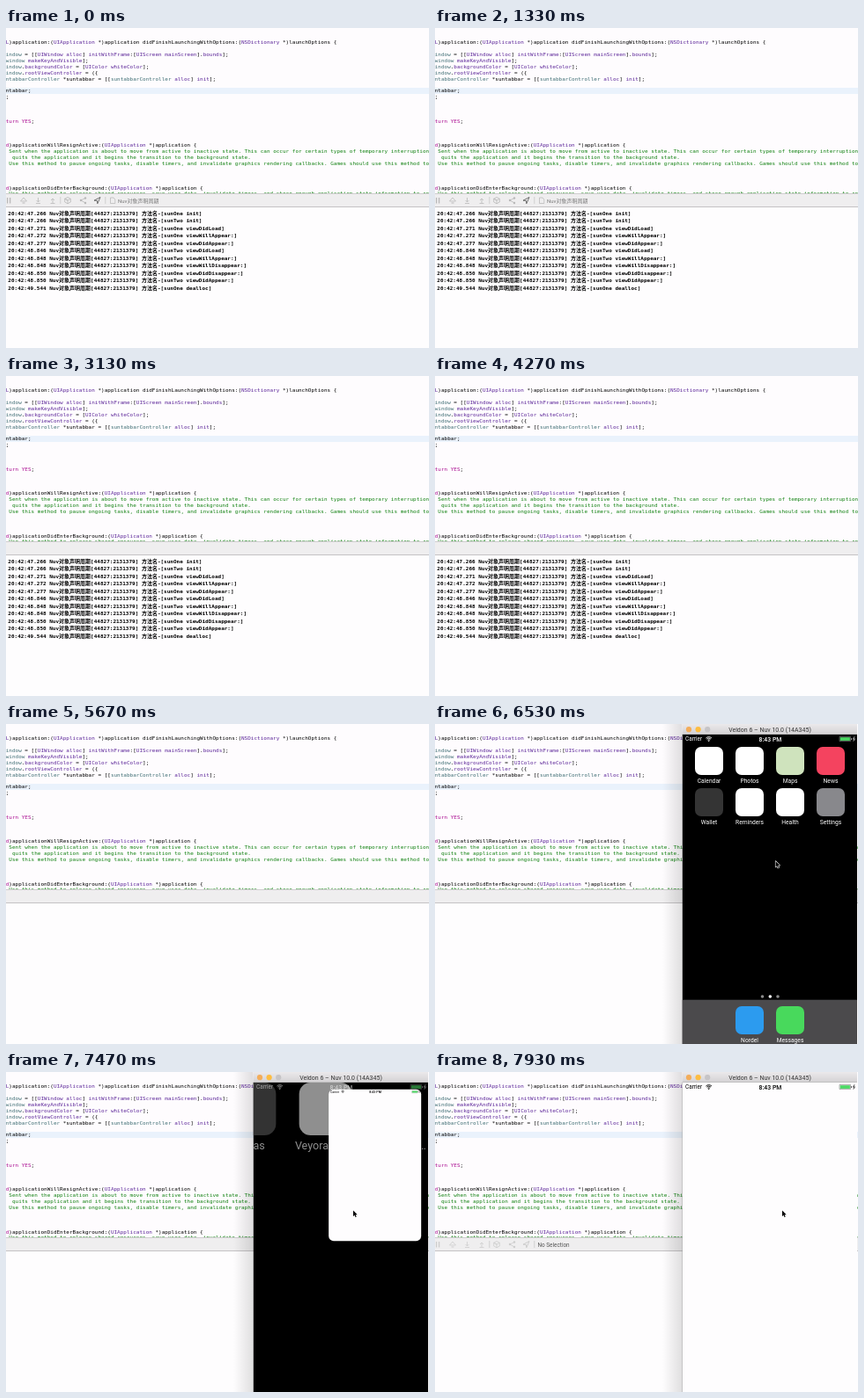
Animation, 480 px wide and 364 px high, one loop 8 s. Source, as an HTML page with a canvas:

```html
<!DOCTYPE html>
<html lang="en">
<head>
<meta charset="utf-8">
<title>View lifecycle demo</title>
<style>
  html, body { margin: 0; width: 100%; height: 100%; overflow: hidden; background: #fff; }
  canvas { display: block; width: 480px; height: 364px; }
</style>
</head>
<body>
<canvas id="stage" width="480" height="364"></canvas>
<script>
const ctx = document.getElementById('stage').getContext('2d');
const LOOP = 8000;
const MONO = '"DejaVu Sans Mono", "Noto Sans CJK SC", "Noto Sans CJK", monospace';
const SANS = 'Roboto, "Noto Sans CJK SC", "Noto Sans CJK", sans-serif';
const CHAR = 3.612;
const PROJECT = 'Nuv对象声明周期';

const SIM = { x: 280.5, y: 12, w: 198.5, h: 352 };
const COLUMNS = [311, 357, 403, 449];
const ICON = 32;
const TIME = {
  simulatorIn: 1650, simulatorOut: 2530, stop: 3000, clear: 4300,
  homeIn: 6100, launch: 7361, launched: 7800, debugBar: 7700
};

const COLORS = { type: '#5c2699', own: '#3f6e74', keyword: '#aa0d91', comment: '#128212', plain: '#000' };
const TOKENS = [
  ['keyword', /^(?:turn|YES|d(?=\)))/],
  ['own', /^(?:window|indow|ntabbarController|suntabbarController)\b/],
  ['type', /^(?:UI\w+|NSDictionary|L(?=\))|alloc|init|initWithFrame|mainScreen|bounds|makeKeyAndVisible|backgroundColor|whiteColor|rootViewController)\b/],
  ['plain', /^(?:\w+|\W)/]
];
const CODE = [
  [0, 'L)application:(UIApplication *)application didFinishLaunchingWithOptions:(NSDictionary *)launchOptions {'],
  [2, 'indow = [[UIWindow alloc] initWithFrame:[UIScreen mainScreen].bounds];'],
  [3, 'window makeKeyAndVisible];'],
  [4, 'indow.backgroundColor = [UIColor whiteColor];'],
  [5, 'indow.rootViewController = ({'],
  [6, 'ntabbarController *suntabbar = [[suntabbarController alloc] init];'],
  [8, 'ntabbar;'],
  [9, ';'],
  [13, 'turn YES;'],
  [17, 'd)applicationWillResignActive:(UIApplication *)application {'],
  [18, ' Sent when the application is about to move from active to inactive state. This can occur for certain types of temporary interruptions (such as'],
  [19, '  quits the application and it begins the transition to the background state.'],
  [20, ' Use this method to pause ongoing tasks, disable timers, and invalidate graphics rendering callbacks. Games should use this method to pause'],
  [24, 'd)applicationDidEnterBackground:(UIApplication *)application {'],
  [25, ' Use this method to release shared resources, save user data, invalidate timers, and store enough application state information to restore']
];
const LOG = [
  '47.266 One init', '47.266 Two init', '47.271 One viewDidLoad', '47.272 One viewWillAppear:',
  '47.277 One viewDidAppear:', '48.846 Two viewDidLoad', '48.848 Two viewWillAppear:',
  '48.848 One viewWillDisappear:', '48.850 One viewDidDisappear:', '48.850 Two viewDidAppear:',
  '49.544 One dealloc'
].map(entry => {
  const [stamp, page, method] = entry.split(' ');
  return `20:42:${stamp} ${PROJECT}[44827:2131379] 方法名-[sun${page} ${method}]`;
});
const APPS = [
  ['Calendar', '#fff'], ['Photos', '#fff'], ['Maps', '#cfe3bd'], ['News', '#f4435f'],
  ['Wallet', '#343434'], ['Reminders', '#fff'], ['Health', '#fff'], ['Settings', '#88888c']
];
const DOCK = [['Nordel', '#2c9bef'], ['Messages', '#48d95c']];

const lerp = (a, b, p) => a + (b - a) * p;
const progress = (t, start, end) => Math.min(1, Math.max(0, (t - start) / (end - start)));

function rect(x, y, w, h, color) {
  ctx.fillStyle = color;
  ctx.fillRect(x, y, w, h);
}

function disc(x, y, r, color) {
  ctx.fillStyle = color;
  ctx.beginPath();
  ctx.arc(x, y, r, 0, 7);
  ctx.fill();
}

function rounded(x, y, w, h, r, color) {
  ctx.fillStyle = color;
  ctx.beginPath();
  ctx.roundRect(x, y, w, h, r);
  ctx.fill();
}

// Laid out at ten times the size so tiny glyphs keep fractional advances.
function text(string, x, y, size, color, { family = SANS, weight = 400, align = 'left' } = {}) {
  ctx.save();
  ctx.translate(x, y);
  ctx.scale(0.1, 0.1);
  ctx.font = `${weight} ${size * 10}px ${family}`;
  ctx.textAlign = align;
  ctx.fillStyle = color;
  ctx.fillText(string, 0, 0);
  ctx.restore();
}

function path(points, color, closed = false, width = 0.8) {
  ctx.beginPath();
  points.forEach(([x, y]) => ctx.lineTo(x, y));
  if (closed) ctx.closePath();
  ctx.strokeStyle = color;
  ctx.lineWidth = width;
  ctx.stroke();
}

function codeLine(line, y) {
  const mono = { family: MONO };
  if (line[0] === ' ') return text(line, -0.3, y, 6, COLORS.comment, mono);
  for (let at = 0; at < line.length;) {
    const rest = line.slice(at);
    const [kind, pattern] = TOKENS.find(token => token[1].test(rest));
    const word = rest.match(pattern)[0];
    text(word, at * CHAR - 0.3, y, 6, COLORS[kind], mono);
    at += word.length;
  }
}

function editor() {
  rect(0, 0, 480, 189, '#fefcfe');
  rect(0, 68, 480, 7, '#eaf2fc');
  CODE.forEach(([row, line]) => codeLine(line, 18.3 + row * 6.885));
}

function debugIcons(color, pointer) {
  rect(1, 193, 1.3, 6.5, color);
  rect(4, 193, 1.3, 6.5, color);
  path([[16.5, 197], [20, 193], [23.5, 197], [16.5, 197]], color);
  rect(18.5, 198.5, 3, 1, color);
  [[36.5, 1], [53, -1]].forEach(([x, dir]) => {
    path([[x, 196 - 3 * dir], [x, 196 + 2 * dir]], color);
    path([[x - 2, 196], [x, 196 + 2 * dir], [x + 2, 196]], color);
    rect(x - 2.5, 199, 5, 0.8, color);
  });
  path([[70, 192.5], [73.3, 194.3], [73.3, 198], [70, 199.8], [66.7, 198], [66.7, 194.3]], color, true);
  path([[70, 199.8], [70, 196], [66.7, 194.3], [70, 196], [73.3, 194.3]], color);
  path([[90, 193.5], [85, 196], [90, 199]], color);
  [[90, 193.5], [85, 196], [90, 199]].forEach(([x, y]) => disc(x, y, 1.2, color));
  path([[107, 192.5], [100, 196.2], [103.4, 196.4], [103.8, 199.8]], pointer, true);
  [61.5, 112.5].forEach(x => rect(x, 192, 0.7, 8, '#c4c4c4'));
}

function debugBar(t) {
  rect(0, 189, 480, 14, '#efeeef');
  rect(0, 188, 480, 1, '#cfcdcf');
  rect(0, 203, 480, 1, '#c4c2c4');
  if (t < TIME.stop) {
    debugIcons('#b9b9b9', '#505050');
    path([[118.5, 193], [122, 193], [123.8, 195], [123.8, 199.5], [118.5, 199.5]], '#aaa', true, 0.6);
    text(PROJECT, 127, 198.5, 6, '#777');
  } else if (t >= TIME.debugBar) {
    debugIcons('#cdcdcd', '#c4c4c4');
    text('No Selection', 116.5, 198.6, 6.4, '#555');
  }
}

function consolePane(t) {
  rect(0, 204, 480, 160, '#fefdfe');
  if (t >= TIME.clear) return;
  LOG.forEach((line, i) => text(line, 2.3, 213 + i * 8.46, 6, '#000', { family: MONO, weight: 700 }));
}

function statusBar(color) {
  text('Carrier', 284, 19.4, 6.4, color);
  ctx.strokeStyle = color;
  ctx.lineWidth = 0.9;
  [1.6, 3.2, 4.7].forEach(r => {
    ctx.beginPath();
    ctx.arc(310.7, 19.4, r, -Math.PI * 0.75, -Math.PI * 0.25);
    ctx.stroke();
  });
  disc(310.7, 19.2, 0.7, color);
  text('8:43 PM', 380.5, 19.5, 6.9, color, { weight: 500, align: 'center' });
  ctx.globalAlpha *= 0.5;
  path([[459, 14.5], [471.5, 14.5], [471.5, 19.5], [459, 19.5]], color, true, 0.6);
  ctx.globalAlpha /= 0.5;
  rect(459.7, 15.2, 11.2, 3.7, '#4cd964');
  rect(472.2, 16.2, 0.7, 1.7, color);
  path([[476, 14.3], [474.4, 17.2], [476.4, 16.8], [474.8, 19.6]], color, false, 0.7);
}

function appLabel(name, x, y) {
  text(name, x, y + 24.6, 6.7, '#fff', { align: 'center' });
}

function app(name, color, x, y) {
  rounded(x - ICON / 2, y - ICON / 2, ICON, ICON, 7, color);
  appLabel(name, x, y);
}

function homeChrome(page) {
  rect(SIM.x, 313.7, SIM.w, 51, '#4b4a4c');
  [371.5, 380.3, 389].forEach((x, i) => disc(x, 310, 1.8, i === page ? '#fff' : '#8a8a8a'));
  DOCK.forEach(([name, color], i) => app(name, color, COLUMNS[i + 1], 337));
}

function homeScreen() {
  statusBar('#fff');
  APPS.forEach(([name, color], i) => app(name, color, COLUMNS[i % 4], i < 4 ? 42 : 89));
  homeChrome(1);
}

function appScreen() {
  rect(SIM.x, SIM.y, SIM.w, SIM.h, '#fefdfe');
  statusBar('#000');
}

// The home page zooms around the tapped icon while the app grows out of it.
function launchScreen(t) {
  const p = 1 - (1 - progress(t, TIME.launch, TIME.launched)) ** 2;
  const [iconX, iconY] = [COLUMNS[3], 42];
  const zoom = 1 + 2 * p;

  ctx.save();
  ctx.globalAlpha = 1 - p;
  ctx.save();
  ctx.translate(iconX, iconY);
  ctx.scale(zoom, zoom);
  ctx.translate(-iconX, -iconY);
  app('Extras', '#5c5c5c', COLUMNS[1], iconY);
  app('Veyora Drive', '#fff', COLUMNS[2], iconY);
  appLabel('Nuv对象…', iconX, iconY);
  homeChrome(2);
  ctx.restore();
  statusBar('#fff');
  ctx.restore();

  const w = lerp(ICON, SIM.w, p), h = lerp(ICON, SIM.h, p);
  const x = lerp(iconX, SIM.x + SIM.w / 2, p) - w / 2;
  const y = lerp(iconY - ICON / 2, SIM.y, p);
  ctx.save();
  rounded(x, y, w, h, lerp(7, 0, p * p), '#fefdfe');
  ctx.clip();
  ctx.translate(x, y);
  ctx.scale(w / SIM.w, w / SIM.w);
  ctx.translate(-SIM.x, -SIM.y);
  statusBar('#000');
  ctx.restore();
}

function greenScreen() {
  rect(SIM.x, SIM.y, SIM.w, SIM.h, '#39ff35');
  rect(SIM.x, 338.5, SIM.w, 26, '#d0fbd0');
  statusBar('#000');
}

function cursor(x, y) {
  ctx.save();
  ctx.translate(x, y);
  ctx.scale(0.9, 0.9);
  ctx.beginPath();
  [[0, 0], [0, 7.4], [1.7, 5.9], [2.9, 8.6], [4.1, 8], [3, 5.5], [5.2, 5.4]].forEach(([px, py]) => ctx.lineTo(px, py));
  ctx.closePath();
  ctx.lineJoin = 'round';
  ctx.lineWidth = 1.3;
  ctx.strokeStyle = '#fff';
  ctx.stroke();
  ctx.fillStyle = '#000';
  ctx.fill();
  ctx.restore();
}

function simulator(drawScreen) {
  const shade = ctx.createLinearGradient(258, 0, SIM.x, 0);
  shade.addColorStop(0, 'rgba(0,0,0,0)');
  shade.addColorStop(1, 'rgba(0,0,0,0.12)');
  rect(258, 0, SIM.x - 258, 364, shade);

  const bar = ctx.createLinearGradient(0, 0, 0, SIM.y);
  bar.addColorStop(0, '#ebe9eb');
  bar.addColorStop(1, '#d3d1d3');
  rect(SIM.x, 0, SIM.w, SIM.y, bar);
  rect(SIM.x, SIM.y - 0.6, SIM.w, 0.6, '#b4b2b4');
  disc(288, 6.2, 3.1, '#f3ad5a');
  disc(298.6, 6.2, 3.1, '#fdbd41');
  disc(309.2, 6.2, 3.1, '#c6c4c6');
  text('Veldon 6 – Nuv 10.0 (14A345)', 380, 8.8, 7, '#333', { align: 'center' });

  ctx.save();
  ctx.beginPath();
  ctx.rect(SIM.x, SIM.y, SIM.w, SIM.h);
  ctx.clip();
  rect(SIM.x, SIM.y, SIM.w, SIM.h, '#000');
  drawScreen();
  ctx.restore();
}

function draw(t) {
  consolePane(t);
  editor();
  debugBar(t);
  if (t >= TIME.simulatorIn && t < TIME.simulatorOut) {
    simulator(greenScreen);
    cursor(454.5, 173.5);
  } else if (t >= TIME.homeIn) {
    simulator(() => {
      if (t < TIME.launch) homeScreen();
      else if (t < TIME.launched) launchScreen(t);
      else appScreen();
    });
    const p = progress(t, 6560, 7000);
    cursor(lerp(386.5, 394, p), lerp(156, 157.5, p));
  }
}

function frame() {
  draw(performance.now() % LOOP);
  requestAnimationFrame(frame);
}
frame();
</script>
</body>
</html>
```
